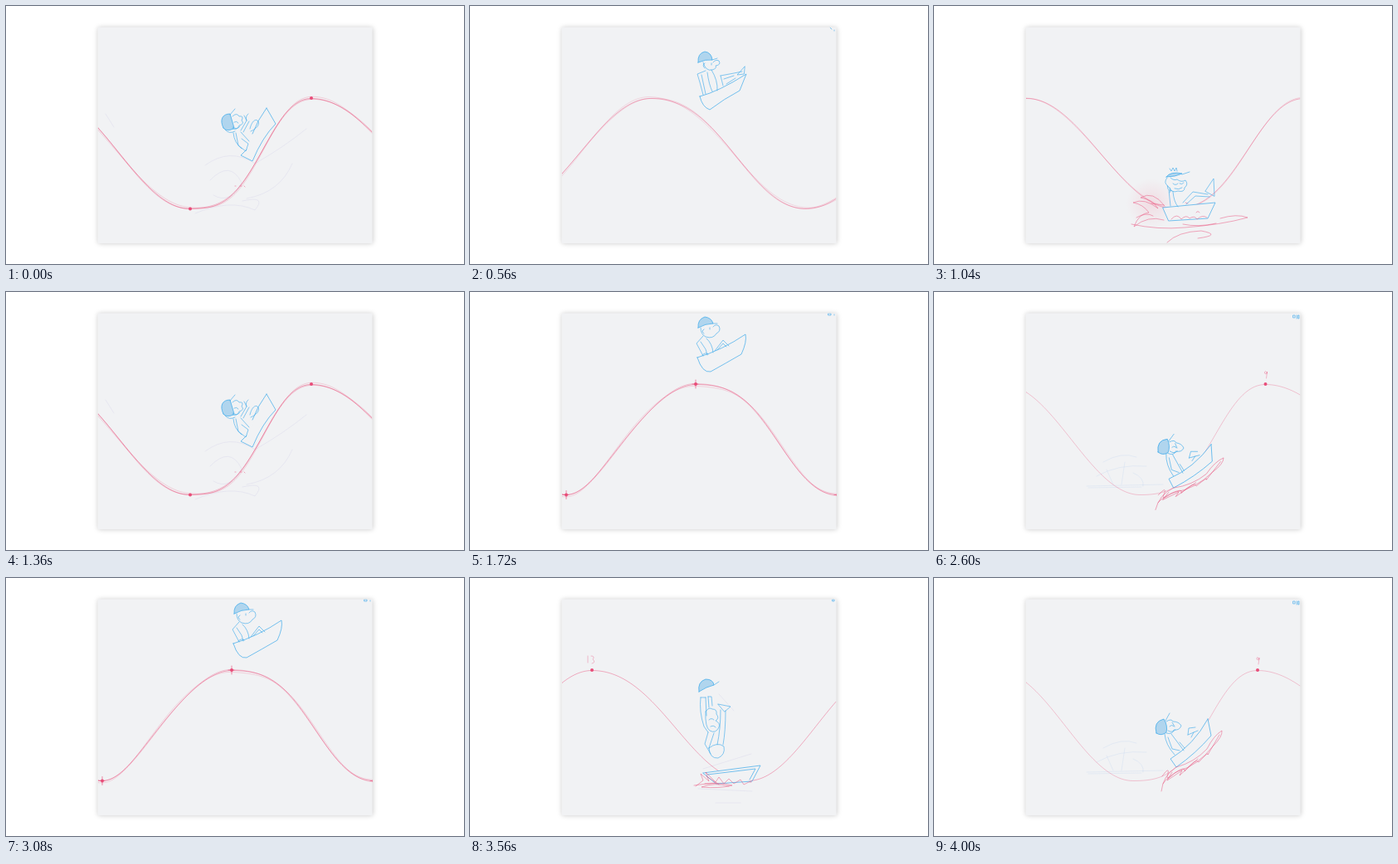
An HTML page with a canvas that plays this animation: 552 px wide and 311 px high, repeating every 4040 ms.

```html
<!DOCTYPE html>
<html lang="en">
<head>
<meta charset="utf-8">
<title>Boat on a wave, pencil test</title>
<style>
html, body { margin: 0; width: 100%; height: 100%; overflow: hidden; background: #fff; }
canvas { display: block; }
</style>
</head>
<body>
<canvas id="stage" width="552" height="311"></canvas>
<script>
const ctx = document.getElementById('stage').getContext('2d');
const LOOP = 4040, CYCLE = 1360;
const BLUE = '#42aceb', RED = '#e84d79', PAPER = '#f1f2f4';

// Start of every held drawing within one cycle
const holds = [0, 80, 160, 240, 320, 360, 400, 480, 560, 680, 760, 840, 960,
  1000, 1040, 1160, 1200, 1240, 1280];

// time, six wave extrema (crest, trough, ...), climb skew, fall skew,
// boat x y angle, sailor x y
const keys = [
  [0, 52, 222, 368, 564, 740, 900, .2, 0, 303, 157, -57, 282, 150],
  [360, -50, 116, 272, 443, 620, 790, -.09, .17, 303, 76, -28, 290, 55],
  [560, -130, 45, 218, 405, 591, 760, 0, .08, 305, 104, -28, 290, 82],
  [840, -190, -19, 147, 335, 500, 680, 0, .05, 315, 238, -8, 293, 170],
  [1040, -220, -50, 112, 290, 446, 650, .1, 0, 308, 247, -2, 295, 222],
  [1280, -260, -90, 76, 240, 390, 600, .2, 0, 310, 200, -48, 290, 190],
  [1360, -290, -124, 52, 222, 368, 564, .2, 0, 303, 157, -57, 282, 150]
];

const poses = [
  {
    ink: .65, lines: 3, dots: 'both',
    boat: 'M314 123L325 142Q309 158 297 187L283 180L290 173M314 123Q303 138 297 154',
    cap: 'M262 147C257 137 261 130 270 130L275 147C271 150 265 151 262 147Z',
    sailor: `M270 131L276 124M273 133q5-5 8 0q6-1 3 5q4 4-3 6q-2 6-8 4M275 140q3-2 5 1M273 146q5 4 9-1
      M264 149q5 6 12 2M283 150L290 138L287 132M290 138q-2-5 2-8M293 139L286 152M294 148C296 139 301 135 304 139
      C306 143 302 148 295 151M274 153Q275 165 284 172M283 152L293 163M277 153L280 168L289 175L292 166L284 160`,
    splash: 'M276 217l1 0M282 217l2 0M287 217l1 1',
    ghost: `M240 192Q270 170 300 190Q335 170 362 148M246 210Q270 185 284 213Q270 240 250 228
      M290 232Q330 225 345 190M228 250Q270 232 300 246Q315 228 285 235M120 130L130 146`
  }, {
    ink: .6, lines: 3, dots: 'both', ticks: true,
    boat: 'M274 79Q304 70 332 51Q334 60 327 75Q308 86 290 96Q280 98 274 79Z',
    cap: 'M275 43Q274 33 283 30Q291 31 293 38Q284 38 275 43Z',
    sailor: `M293 38L298 38M278 43Q278 51 284 54Q293 57 297 50Q303 47 300 41Q296 38 293 42M289 43v2M282 45q-4 2 0 5
      M281 53L273 62L281 77M278 60L284 69L286 76M285 56Q292 62 293 73M295 71L305 58L312 65M298 70L305 62L309 66
      M280 76q4-4 7-1`,
    mark: 'M432 26h3v2h-3zM439 27v1'
  }, {
    ink: .5, lines: 3,
    boat: 'M277 109Q300 103 333 82L325 102Q306 112 289 125Q280 122 277 109Z',
    cap: 'M275 68Q274 57 283 55Q291 56 292 65Q284 64 275 68Z',
    sailor: `M292 65L298 63M281 68Q284 79 292 77Q298 75 296 72Q303 71 300 66Q296 64 293 68M283 69q-4 2 0 6M291 69v2
      M284 78L274 82L277 92L281 107M279 83L284 106M291 77Q299 90 298 102M286 80Q288 95 292 103
      M302 84L318 81L328 79M302 84L305 96M306 88L318 84M331 73L322 83L330 82ZM309 94L320 87`,
    mark: 'M434 26l2 2M439 29v1'
  }, {
    ink: .55, lines: 1, dots: 'crest', note: 'M-5 -17v8M-1 -17q5 0 2 4q4 4-1 5',
    boat: 'M281 235L350 226L340 245L297 248ZM286 237L344 230L337 243',
    cap: 'M276 137Q274 125 284 122Q293 122 294 129Q285 131 276 137Z',
    sailor: `M294 129L300 125M278 144h6M278 144Q276 161 282 179L287 186M284 144L285 166M287 143h4L292 154M287 143L288 156
      M284 161q4-6 8-3q6 0 5 6q4 5-1 8q6 3 4 8q-4 8-11 4q-6-4-5-23M288 171q3-3 6 0M290 179q4-2 6 1
      M299 152L314 155L307 161ZM302 159Q302 182 298 201M308 160Q308 185 305 201
      M288 205Q289 218 299 217Q308 213 306 203Q298 197 288 205ZM287 186L283 200L290 212M294 187L288 205`,
    splash: `M272 251L281 244L278 236L288 245L284 234L296 246L300 240L306 248L312 242L318 248L326 243L330 249L340 244
      M270 250Q300 245 316 250Q300 254 279 252Q295 246 312 251M285 239L300 249M283 248L297 247M337 246l2 0`,
    ghost: 'M281 230L339 212M300 140L318 160M275 254L340 257M296 271h30',
    mark: 'M437 26h2v2h-2z'
  }, {
    ink: .5, lines: 2,
    boat: 'M276 243L339 237L330 256L283 259Z',
    cap: 'M280 206Q285 199 299 202Q291 206 280 206Z',
    sailor: `M299 203L308 200M284 196l2 3l2-4l2 4l2-4l1 4M281 207q-5 6 1 10q-2 5 5 6M285 207q4 4 8 2q5 4 10 1
      q4 5-1 9q0 6-8 4q-8 3-10-4M288 214q3 3 6 0M296 214q3 2 5-1M290 220q5 2 9-1M283 222L285 241
      M288 224Q289 236 294 242M281 217q6 3 3 8M300 237L312 224L330 227M304 239L315 229L332 230M327 223L337 208L338 229Z`,
    splash: `M278 241Q264 222 249 231Q263 233 270 244Q254 231 240 237Q252 239 259 249Q247 250 241 266Q258 252 277 258
      M244 255Q256 248 264 253M277 240L262 238M238 263Q270 270 302 267Q345 264 378 255Q365 250 345 256
      M281 285Q294 272 322 271Q348 276 318 280M286 257q7-8 12 0q6-6 10-1q6-4 9 1q7-6 12-2M300 263q18 4 40-1
      M316 249q2-3 4 0M303 237l3 1`,
    smudge: [262, 238, 30]
  }, {
    ink: .38, lines: 1, dots: 'crest', note: 'M2 -13q-3-5-3 0q3 2 3-2l-1 8',
    boat: 'M330 170L334 190Q316 211 292 228L285 218Q313 201 330 170Z',
    cap: 'M268 187Q264 173 277 170Q282 178 280 186Q274 191 268 187Z',
    sailor: `M279 172L284 163M280 173q6-4 8 0q7 0 10 5q-2 6-9 5q-1 6-9 4M284 179q3-3 5 0M287 174l3 5M282 184q5 3 9-1
      M278 188Q279 201 290 213M286 188L301 208M282 192L287 206L296 208M306 189L307 181L315 180M306 189L318 184
      M310 192L313 186M296 198L302 205`,
    splash: `M274 257Q276 238 292 228Q314 222 329 206Q337 190 347 184Q348 191 336 203Q318 226 294 233Q281 240 276 248
      M275 239Q284 226 282 236Q278 247 290 235Q304 226 302 233Q316 216 319 222Q332 208 330 213L344 189M287 234L281 244L299 232L296 238L318 218`,
    ghost: `M184 234L276 232M186 236L250 235M196 222Q222 207 256 210M204 205Q226 192 244 199M208 214L216 232
      M230 205L226 232M240 218Q254 224 252 234`,
    ghostInk: '#8fb8ea',
    mark: 'M433 28h2v3h-2zM437 28v4M439 28h1v4h-1z'
  }
];

// Smooth curve through the keys for one column
function track(col, time) {
  const i = Math.max(0, keys.findLastIndex(k => k[0] <= time));
  const a = keys[i], b = keys[i + 1], span = b[0] - a[0], u = (time - a[0]) / span;
  const slope = j => {
    const p = keys[Math.max(0, j - 1)], n = keys[Math.min(keys.length - 1, j + 1)];
    return (n[col] - p[col]) / (n[0] - p[0]) * span;
  };
  const v = 1 - u;
  return v * v * (1 + 2 * u) * a[col] + u * v * v * slope(i)
    + u * u * (3 - 2 * u) * b[col] - u * u * v * slope(i + 1);
}

function pencil(path, color, alpha, width = .8) {
  ctx.strokeStyle = color;
  ctx.globalAlpha = alpha;
  ctx.lineWidth = width;
  ctx.stroke(typeof path === 'string' ? new Path2D(path) : path);
  ctx.globalAlpha = 1;
}

// Moves a drawing made around its key position to where it belongs now
function placed(key, col, time, draw) {
  const turn = (track(11, time) - key[11]) * Math.PI / 180;
  ctx.save();
  ctx.translate(track(col, time), track(col + 1, time));
  ctx.rotate(turn);
  ctx.translate(-key[col], -key[col + 1]);
  draw();
  ctx.restore();
}

function drawPaper() {
  ctx.fillStyle = '#fff';
  ctx.fillRect(0, 0, 552, 311);
  ctx.save();
  ctx.shadowColor = 'rgba(0,0,0,.22)';
  ctx.shadowBlur = 6;
  ctx.fillStyle = PAPER;
  ctx.fillRect(110.5, 25.5, 331, 260.5);
  ctx.restore();
}

function drawWave(pose, time) {
  const ends = [1, 2, 3, 4, 5, 6].map(c => track(c, time));
  const climb = track(7, time), fall = track(8, time);
  const height = x => {
    const i = Math.max(0, Math.min(4, ends.findLastIndex(e => e <= x))), rising = i % 2;
    const u = (x - ends[i]) / (ends[i + 1] - ends[i]);
    const bend = u - (rising ? climb : fall) * Math.sin(Math.PI * u) * (1 - u);
    return 178 + (rising ? 66.5 : -66.5) * Math.cos(Math.PI * bend);
  };
  for (let n = 0; n < pose.lines; n++) {
    const line = new Path2D();
    for (let x = 111; x <= 441; x += 3)
      line.lineTo(x, height(x) + n * 1.2 * Math.sin(x * .035 + n * 2));
    pencil(line, RED, pose.ink / (1 + n * .7), .8);
  }
  ends.forEach((x, i) => {
    const trough = i % 2;
    if (!pose.dots || trough && pose.dots !== 'both') return;
    ctx.save();
    ctx.translate(x, trough ? 244.5 : 111);
    ctx.fillStyle = RED;
    ctx.beginPath();
    ctx.arc(0, 0, 2, 0, 7);
    ctx.fill();
    if (pose.ticks) pencil('M-4 0H3M0 -5V5', RED, .8);
    if (pose.note && !trough) pencil(pose.note, RED, .6, .6);
    ctx.restore();
  });
}

function drawSmudge([x, y, r]) {
  const glow = ctx.createRadialGradient(x, y, 0, x, y, r);
  glow.addColorStop(0, 'rgba(240,110,140,.16)');
  glow.addColorStop(1, 'rgba(240,110,140,0)');
  ctx.fillStyle = glow;
  ctx.fillRect(x - r, y - r, 2 * r, 2 * r);
}

function draw(now) {
  const phase = now % LOOP % CYCLE;
  const time = holds.findLast(h => h <= phase);
  let nearest = 0;
  keys.forEach((k, i) => {
    if (Math.abs(k[0] - time) < Math.abs(keys[nearest][0] - time)) nearest = i;
  });
  const key = keys[nearest], pose = poses[nearest % poses.length];

  drawPaper();
  ctx.save();
  ctx.beginPath();
  ctx.rect(110.5, 25.5, 331, 260.5);
  ctx.clip();
  ctx.lineCap = ctx.lineJoin = 'round';
  if (pose.ghost) pencil(pose.ghost, pose.ghostInk || '#a9a6d8', .22, .7);
  drawWave(pose, time);
  placed(key, 9, time, () => {
    if (pose.smudge) drawSmudge(pose.smudge);
    ctx.fillStyle = PAPER;
    ctx.fill(new Path2D(pose.boat));
    pencil(pose.boat, BLUE, .8, .9);
    if (pose.splash) pencil(pose.splash, RED, .6);
  });
  placed(key, 12, time, () => {
    ctx.fillStyle = 'rgba(70,165,225,.38)';
    ctx.fill(new Path2D(pose.cap));
    pencil(pose.cap, BLUE, .85, .9);
    pencil(pose.sailor, BLUE, .8);
  });
  if (pose.mark) pencil(pose.mark, BLUE, .8);
  ctx.restore();
}

function tick() {
  draw(performance.now());
  requestAnimationFrame(tick);
}
tick();
</script>
</body>
</html>
```
